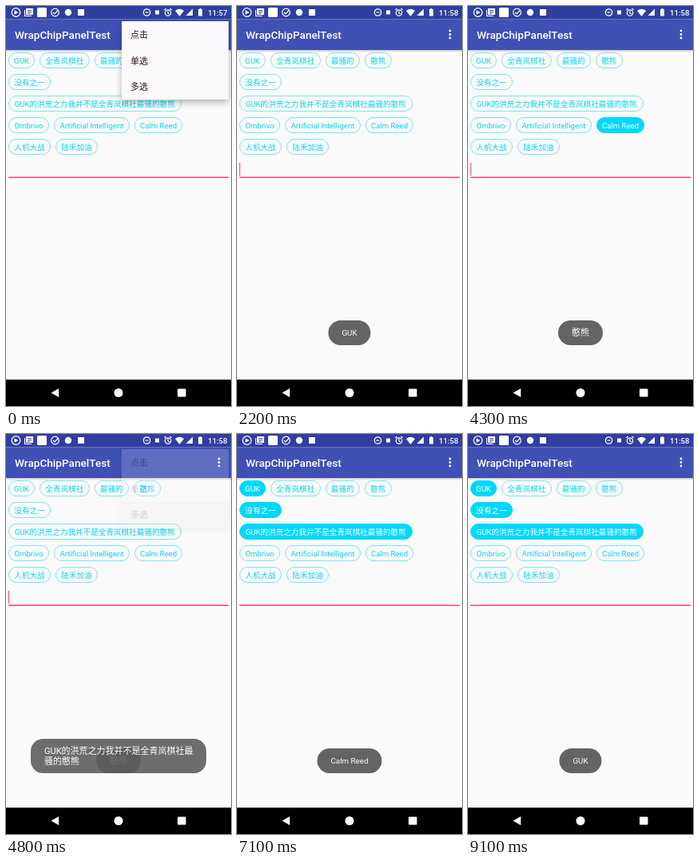
Animation, 282 px wide and 500 px high, one loop 9400 ms. Source, as an HTML page:

```html
<!DOCTYPE html>
<html lang="zh-CN">
<head>
<meta charset="utf-8">
<style>
html, body { margin: 0; width: 100%; height: 100%; overflow: hidden; background: #fafafa; }
body { position: relative; font: 9.6px/20px Roboto, "Noto Sans CJK SC", "Noto Sans CJK", sans-serif; }
body > * { position: absolute; box-sizing: border-box; white-space: nowrap; }
svg { left: 0; top: 0; }
#clock { left: 253px; top: 0; line-height: 17px; color: #fff; font-weight: 500; }
#title { left: 11px; top: 16px; line-height: 40px; font-size: 13.6px; font-weight: 500; color: #fff; }
.tag { height: 20px; border: 1px solid #7ee4f4; border-radius: 10px; line-height: 19px; text-align: center; color: #10d3ec; }
.tag.on { background: #00d8fb; border-color: #00d8fb; color: #fff; }
#cursor { left: 3px; top: 196px; width: 1px; height: 16px; background: #ff4081; }
#menu { left: 145px; top: 19px; width: 134px; height: 98px; padding-top: 1px; background: #fbf9fb; border-radius: 1px;
  box-shadow: 0 3px 8px rgba(0,0,0,.3); font-size: 11px; }
#menu div { height: 32.5px; padding-left: 11px; line-height: 34px; color: #2a1424; }
.toast { left: 141px; bottom: 76px; padding: 9px 17px; border-radius: 15.5px; transform: translateX(-50%);
  background: rgba(0,0,0,.6); color: #fff; line-height: 13px; font-size: 11px; }
.toast.latin { font-size: 9.8px; }
.toast.long { width: 220px; height: 43px; padding-top: 8.5px; }
</style>
</head>
<body>
<svg width="282" height="500">
  <defs>
    <linearGradient id="shade" x2="0" y2="1">
      <stop stop-color="#000" stop-opacity=".2"/><stop offset="1" stop-color="#000" stop-opacity="0"/>
    </linearGradient>
  </defs>
  <path fill="#303f9f" d="M0 0h282v16.5H0z"/>
  <path fill="#3f51b5" d="M0 16.5h282V55H0z"/>
  <path fill="url(#shade)" d="M0 55h282v3H0z"/>
  <path fill="#ff4081" d="M3 213.4h276v1.5H3z"/>
  <path d="M0 467h282v33H0z"/>
  <g fill="#fff">
    <path d="M10.5 5.3l5 2.7-5 2.7zM40.5 2h9q1.5 0 1.5 1.5v9q0 1.5-1.5 1.5h-9q-1.5 0-1.5-1.5v-9Q39 2 40.5 2z"/>
    <path d="M25 3h9v8h-9zM23 5h1v7h8v1h-9z"/>
    <circle cx="78" cy="8" r="4.2"/>
    <path d="M90 4h8v8h-8zM187 5.5h5v5h-5z"/>
    <path d="M212 6q5.5-4.5 11 0l-5.5 7z"/>
    <path d="M234 3.5V12h-8.5z"/>
    <path d="M241 4h1.5V3h2v1h1.5v8.5h-5z"/>
    <circle cx="267" cy="31" r="1.4"/><circle cx="267" cy="35.5" r="1.4"/><circle cx="267" cy="40" r="1.4"/>
    <path d="M66.2 478v11l-9.7-5.5zM216 478.500h8.500q1 0 1 1v8q0 1-1 1H216q-1 0-1-1v-8q0-1 1-1z"/>
    <circle cx="141" cy="483.500" r="5.500"/>
  </g>
  <g fill="none" stroke="#fff" stroke-width="1.2">
    <circle cx="12.500" cy="8" r="5.300"/>
    <circle cx="61.500" cy="8" r="4.800"/><path d="M59 8l2 2 4-4.500"/>
    <circle cx="176.500" cy="8" r="4.200"/><path d="M174.500 8h4"/>
    <circle cx="203" cy="8.500" r="3.700"/><path d="M203 6v3l2 1M198.500 5l2-2M207.500 5l-2-2"/>
    <path stroke="#303f9f" stroke-width=".9" d="M27 5.500h5M27 7.500h5M27 9.300h3"/>
  </g>
</svg>
<div id="clock"></div>
<div id="title">WrapChipPanelTest</div>
<div id="cursor"></div>
<script>
const LOOP = 9400, FADE = 400;
const LONG = 'GUK的洪荒之力我并不是全青岚棋社最骚的憨熊';

// text, left, width, row, then spans [from, to] in which it is selected
const tags = [
  ['GUK', 3, 33, 0, [4900, LOOP]],
  ['全青岚棋社', 42, 62.5, 0],
  ['最骚的', 111, 42.5, 0],
  ['憨熊', 160, 33.5, 0],
  ['没有之一', 3, 53, 1, [5400, LOOP]],
  [LONG, 3, 216.5, 2, [3300, 3900], [6200, LOOP]],
  ['Ombrivo', 3, 51, 3],
  ['Artificial Intelligent', 60, 95, 3],
  ['Calm Reed', 161, 60, 3, [3900, 4600]],
  ['人机大战', 3, 53, 4],
  ['陆禾加油', 62, 53, 4]
];
// text, start of fade in, start of fade out
const toasts = [
  ['GUK', 770, 2750],
  [LONG, 2750, 3850],
  ['憨熊', 3850, 4500],
  [LONG, 4500, 5700],
  ['Calm Reed', 5700, 7700],
  ['GUK', 7700, LOOP]
];
// opening, choice made, chosen row
const menus = [[-300, 100, 0], [2600, 2750, 1], [4400, 4550, 2]];

const $ = id => document.getElementById(id);
const clamp = x => Math.max(0, Math.min(1, x));

function add(className, text) {
  const el = document.createElement('div');
  el.className = className;
  el.textContent = text;
  document.body.append(el);
  return el;
}

const tagEls = tags.map(([text, left, width, row]) => {
  const el = add('tag', text);
  el.style.cssText = `left:${left}px;top:${58.3 + row * 26.8}px;width:${width}px`;
  return el;
});

const toastEls = toasts.map(([text]) => {
  const el = add('toast', text);
  if (text === LONG) {
    el.classList.add('long');
    el.innerHTML = LONG.replace('最', '最<br>');
  } else if (/^[A-Z]/.test(text)) el.classList.add('latin');
  return el;
});

const menu = add('', '');
menu.id = 'menu';
menu.innerHTML = '<div>点击</div><div>单选</div><div>多选</div>';

function draw(t) {
  $('clock').textContent = t < 2000 ? '11:57' : '11:58';

  tagEls.forEach((el, i) =>
    el.classList.toggle('on', tags[i].slice(4).some(([a, b]) => t >= a && t < b)));

  toastEls.forEach((el, i) => {
    const [, start, end] = toasts[i];
    const rise = 1 - (1 - clamp((t - start) / FADE)) ** 2;
    el.style.opacity = Math.min(rise, 1 - clamp((t - end) / FADE));
  });

  const [open, pick, row] = menus.findLast(m => t >= m[0]);
  menu.style.opacity = Math.min(clamp((t - open + 50) / 150), 1 - clamp((t - pick) / 300));
  [...menu.children].forEach((el, i) =>
    el.style.background = t >= pick && i === row ? '#ddd' : '');

  // The blink restarts after the last menu.
  const blink = (t + (t < 4400 ? 900 : 400)) % 1000 < 500;
  $('cursor').style.opacity = blink && t >= 400 ? 1 : 0;
}

function tick() {
  draw(Math.floor(performance.now() % LOOP / 100) * 100);
  requestAnimationFrame(tick);
}
tick();
</script>
</body>
</html>
```
